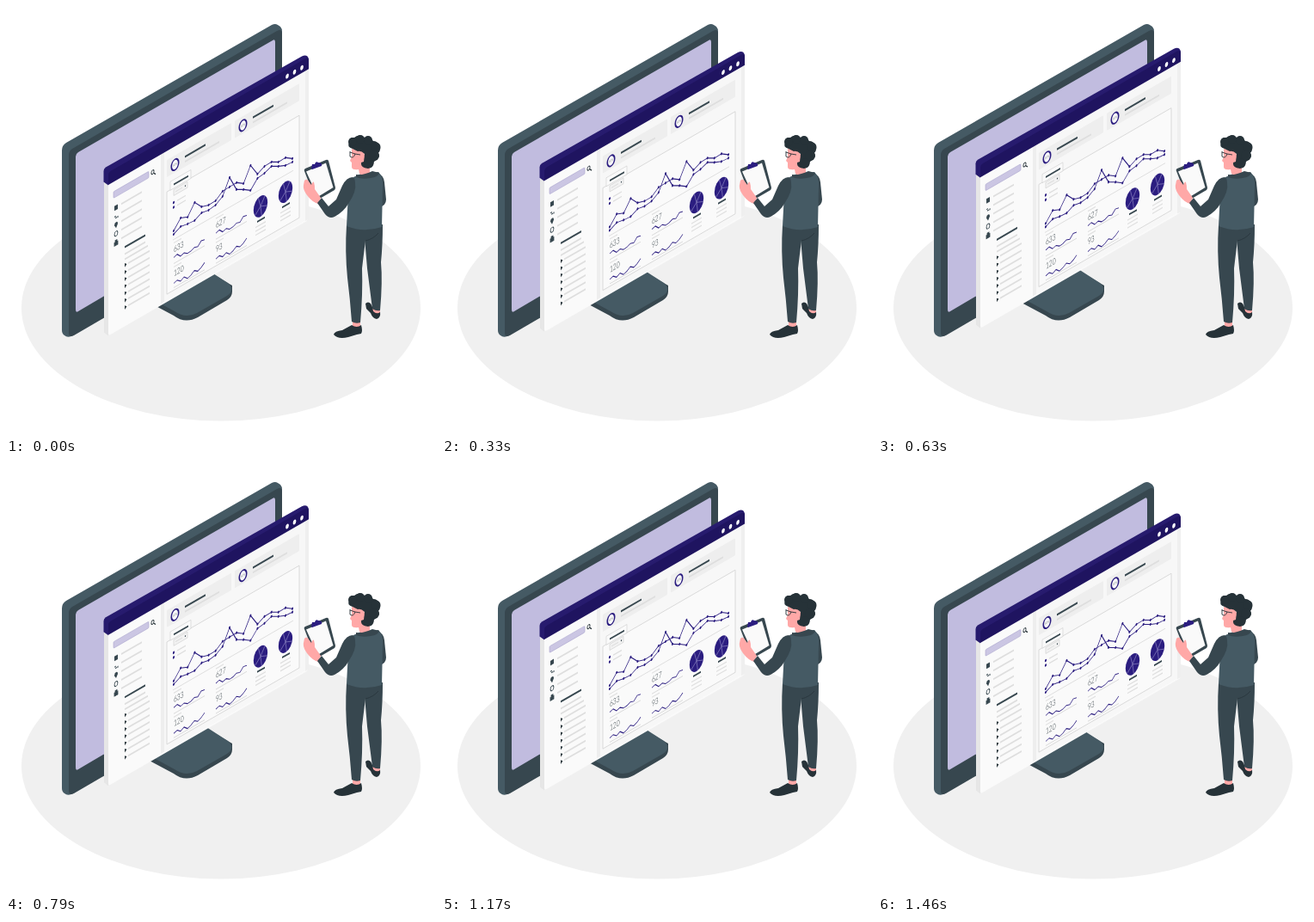
Recreate the animation shown at these times as an HTML page. Size 500 by 500 pixels, loop 1500 ms.

```html
<!DOCTYPE html>
<html lang="en">
<head>
<meta charset="utf-8">
<title>Dashboard</title>
<style>
  html, body { margin: 0; height: 100%; overflow: hidden; background: #fff; }
  svg { display: block; width: 100vw; height: 100vh; }
  text { font-family: Lato, sans-serif; font-weight: 300; fill: #263238; }
</style>
</head>
<body>
<svg viewBox="0 0 500 500">
  <ellipse cx="250" cy="351" rx="232" ry="131.5" fill="#f0f0f0"/>

  <g id="stand">
    <path fill="#37474f" d="M150 336L195 360Q208 370 223 362L257 342Q263 338 263 332V325L230 306Z"/>
    <path fill="#455a64" d="M150 330L196 355Q209 364 222 357L257 337Q267 330 258 322L230 304Z"/>
  </g>

  <g id="monitor">
    <path fill="#455a64" d="M65 168Q65 162 70 159L309 22Q313 20 316 22L319 24Q321 26 321 30V240L76 384Q71 386 68 383Q65 381 65 377Z"/>
    <path fill="#37474f" d="M73 173Q73 169 77 166L315 29Q321 26 321 32V242L79 383Q73 386 73 380Z"/>
    <path fill="#c1bcdf" d="M81 175Q81 172 84 170L310 40Q313 38 313 42V220L84 355Q81 357 81 353Z"/>
  </g>

  <g id="panel">
    <path fill="#e6e6e6" d="M114 191.400L119 195.400V383.400L114 379.400Z"/>
    <path fill="#271b6e" d="M113.500 192Q113.500 189 116 187.500L344 58.500Q348 56.500 350.500 58.500Q352 60 352 63L119 208.400L113.500 204.400Z"/>
    <g id="face" transform="translate(119 193.400) skewY(-30)"></g>
  </g>

  <g id="man">
    <path fill="#263238" d="M418 346Q421 343 424 346L428 354L435 355Q436 363 431 364Q426 363 424 357L419 352Z"/>
    <path fill="#ffa8a7" d="M426 350H435V356Q431 359 427 355ZM403 364H412V373H403Z"/>
    <path fill="#263238" d="M381 382Q382 378 391 377L402 371Q408 375 413 371Q415 378 413 381L408 382L398 385Q386 388 381 382Z"/>
    <path fill="#37474f" d="M411 257L438 254Q438 278 436 298Q438 320 435 354Q430 355 426 352L420 305L417 270Z"/>
    <path fill="#37474f" d="M396 255L436 257Q432 266 418 272L414 305Q415 335 412 368Q407 370 402 367Q400 340 397 316Q394 285 396 255Z"/>
    <path fill="none" stroke="#263238" stroke-width=".7" d="M433 264Q427 271 418 273"/>
    <path fill="#37474f" d="M432 195Q439 196 440 205L442 225Q442 232 434 234L429 213Z"/>
    <path fill="#455a64" d="M404 199L413 195L433 193Q439 198 438 211L437 257Q416 264 396 256L398 218Z"/>

    <path fill="#37474f" d="M347 192Q346 190 348 189L372 179Q374 178 375 180L383 211Q383 213 382 214L363 225L359 223Z"/>
    <path fill="#fafafa" d="M349 192.500L372 182.500L380.500 211L362.500 222Z"/>
    <path fill="#2b1d80" d="M355 189L356 184L359 184Q360 180 363 182L367 183L367 186L356 190Z"/>
    <path fill="#ffa8a7" d="M347 203Q350 200 352 204L355 208Q357 203 358 205Q359 208 359 213L366 223L363 230Q356 228 350 220Q345 213 346 208Z"/>
    <path fill="#37474f" d="M403 199Q396 199 391 209L384 225L375 233L367 223L362 229L371 242Q376 248 382 245Q393 239 398 230Q408 215 406 206Q406 200 403 199Z"/>

    <path fill="#ffa8a7" d="M402 166L414 168L423 182V195Q416 199 411 195L410 190Q402 191 402 187L402 182L400 180L402 175Z"/>
    <path fill="#37474f" d="M407 196Q416 197 426 192L434 194Q433 199 424 200Q414 202 407 199Z"/>
    <path fill="#263238" d="M409 169Q413 168 417 172L416 181L413 182Q412 188 421 189Q427 187 428 181Q436 176 433 171Q437 166 434 162Q432 157 427 157Q423 151 417 153Q410 148 405 153Q398 152 399 159Q396 164 403 166Z"/>
    <g fill="#263238">
      <circle cx="403" cy="158" r="5"/><circle cx="412" cy="155" r="5"/>
      <circle cx="421" cy="156" r="5"/><circle cx="430" cy="164" r="5.500"/>
      <circle cx="428" cy="174" r="6"/><circle cx="422" cy="183" r="5.500"/>
    </g>
    <ellipse cx="413" cy="175.500" rx="3.300" ry="4.300" fill="#ffa8a7"/>
    <path fill="none" stroke="#263238" stroke-width=".9" d="M400 169V175Q404 178 406 172L400 170M406 172L412 173"/>
  </g>
</svg>

<script>
const PURPLE = '#2b1d80', DARK = '#37474f', LIGHT = '#dedede';
const SQUASH = .68; // foreshortening of round shapes and text on the slanted face
const face = document.getElementById('face');
const panel = document.getElementById('panel');

function add(tag, attrs, text = '') {
  const el = document.createElementNS('http://www.w3.org/2000/svg', tag);
  for (const key in attrs) el.setAttribute(key, attrs[key]);
  el.textContent = text;
  face.append(el);
}
const rect = (x, y, width, height, fill, more) => add('rect', { x, y, width, height, fill, ...more });
const path = (d, more) => add('path', { d, fill: 'none', stroke: PURPLE, ...more });
const bar = (x1, x2, y, stroke = LIGHT, width = 2) =>
  path(`M${x1} ${y}H${x2}`, { stroke, 'stroke-width': width });
const oval = (cx, cy, r, fill, more) => add('ellipse', { cx, cy, rx: r * SQUASH, ry: r, fill, ...more });
const label = (x, y, size, text, more) =>
  add('text', { transform: `translate(${x} ${y}) scale(${SQUASH} 1)`, 'font-size': size, ...more }, text);

// Window
rect(0, 6, 233, 184, '#fafafa', { rx: 3 });
rect(61, 14, 4, 174, '#eeeeee');
rect(65, 14, 168, 174, '#f7f7f7');
rect(229, 14, 4, 175, '#efefef');
path('M0 14.500V3Q0 0 3 0H229Q233 0 233 4V14.500Z', { fill: '#1f1460', stroke: 'none' });
for (const x of [208, 216.5, 225]) oval(x, 8.3, 2.7, '#fff');

// Sidebar
rect(6, 26, 41, 7.5, '#cbc6e3', { rx: 1, stroke: '#aaa4cc', 'stroke-width': .5 });
oval(51.5, 29.5, 2.3, 'none', { stroke: '#263238', 'stroke-width': .9 });
path('M52.500 31L55 34', { stroke: '#263238', 'stroke-width': 1 });
rect(7, 43.5, 4, 5.5, DARK);
path('M7 56H9M11 57V59M8 58H10', { stroke: DARK, 'stroke-width': 1.1 });
path('M9 70L7 66Q7 63 9 63Q11 63 11 66Z', { fill: DARK, stroke: 'none' });
oval(9, 76.5, 2.8, 'none', { stroke: DARK, 'stroke-width': .9 });
path('M7 90V86H11V90ZM8 86V84H10V86', { fill: DARK, stroke: DARK, 'stroke-width': .8 });
for (let i = 0; i < 5; i++) bar(15, 39, 45.5 + i * 10);
bar(19, 43, 98, DARK, 2.2);
bar(19, 43, 106);
bar(19, 46, 112);
for (let i = 0; i < 7; i++) {
  const y = 119 + i * 8.2;
  path(`M19 ${y - 2.3}L21.500 ${y}L19 ${y + 2.3}Z`, { fill: '#263238', stroke: 'none' });
  bar(23, 48, y);
}

// Summary cards
for (const x of [68, 147]) {
  rect(x, 25, 75, 20, '#eeeeee', { rx: 1 });
  oval(x + 9.5, 35.8, 6.2, '#fafafa', { stroke: PURPLE, 'stroke-width': 1.6 });
  label(x + 9.5, 37, 3.8, '60%', { 'text-anchor': 'middle' });
  bar(x + 21, x + 45, 33.3, DARK, 2.2);
  bar(x + 21, x + 61, 39);
}

// Chart frame
rect(68, 62, 154, 119, '#fafafa', { stroke: '#d2d2d2', 'stroke-width': .7 });
rect(72, 52.5, 24, 10, '#fafafa', { stroke: '#d2d2d2', 'stroke-width': .6 });
bar(76, 93, 58, DARK);
rect(76, 64, 16, 7, '#f2f2f2', { stroke: '#d2d2d2', 'stroke-width': .6 });
bar(78, 86, 67.5, LIGHT, 1.2);
oval(89.5, 67.5, .9, DARK);
for (const y of [79, 84.5]) {
  oval(76, y, 1.6, PURPLE);
  bar(80, 90, y, LIGHT, 1.4);
}
bar(75, 215, 122, '#d2d2d2', .6);

// Screen heights of each series, placed on the slanted face
const SLOPE = Math.tan(Math.PI / 6);
const series = [
  [261, 246, 245, 228, 233, 231, 226, 215, 210, 205, 206, 185, 195, 186, 181, 181, 176, 177],
  [265, 256, 253, 249, 240, 237, 231, 221, 199, 213, 213, 214, 200, 194, 186, 186, 185, 181]
];
for (const ys of series) {
  const points = ys.map((y, i) => [76 + i * 8.12, y - 193 + SLOPE * (76 + i * 8.12)]);
  path('M' + points.join('L'), { 'stroke-width': .9 });
  for (const [x, y] of points) oval(x, y, 1.5, PURPLE);
}

// Counters with sparklines
const waves = [
  [0, -1.5, 3, 1.5, 4.5, 4, 2, 3.5, -1, 0],
  [2, .5, 4, 1.5, 5.5, 4, 1, 4, 2, -1.5]
];
[['633', 76, 137], ['627', 125, 137], ['120', 76, 165], ['93', 125, 165]].forEach(([text, x, y], i) => {
  bar(x, x + 9, y - 11, LIGHT, 1.2);
  label(x, y, 9.8, text);
  path('M' + waves[i >> 1].map((dy, k) => [x + k * 4, y + 6 + dy]).join('L'), { 'stroke-width': .9 });
  bar(x, x + 36, y + 13, '#d2d2d2', .7);
});

// Pies
for (const x of [177, 206]) {
  oval(x, 141.7, 12, PURPLE);
  for (const a of [-1.9, -.9, .3, 1.4, 2.5])
    path(`M${x} 141.700l${12 * SQUASH * Math.cos(a)} ${12 * Math.sin(a)}`, { stroke: '#8f87c4', 'stroke-width': .6 });
  bar(x - 4, x + 5, 157.5, DARK);
  for (const y of [163, 167.5, 172]) bar(x - 6, x + 6, y, LIGHT, 1.3);
}

// The window rises 10 units and returns at constant speed, then rests briefly
const PERIOD = 1500, TRAVEL = 1460;
function frame(now) {
  const phase = Math.min(1, now % PERIOD / TRAVEL);
  const lift = 10 * (1 - Math.abs(1 - 2 * phase));
  panel.setAttribute('transform', `translate(0 ${-lift})`);
  requestAnimationFrame(frame);
}
requestAnimationFrame(frame);
</script>
</body>
</html>
```
